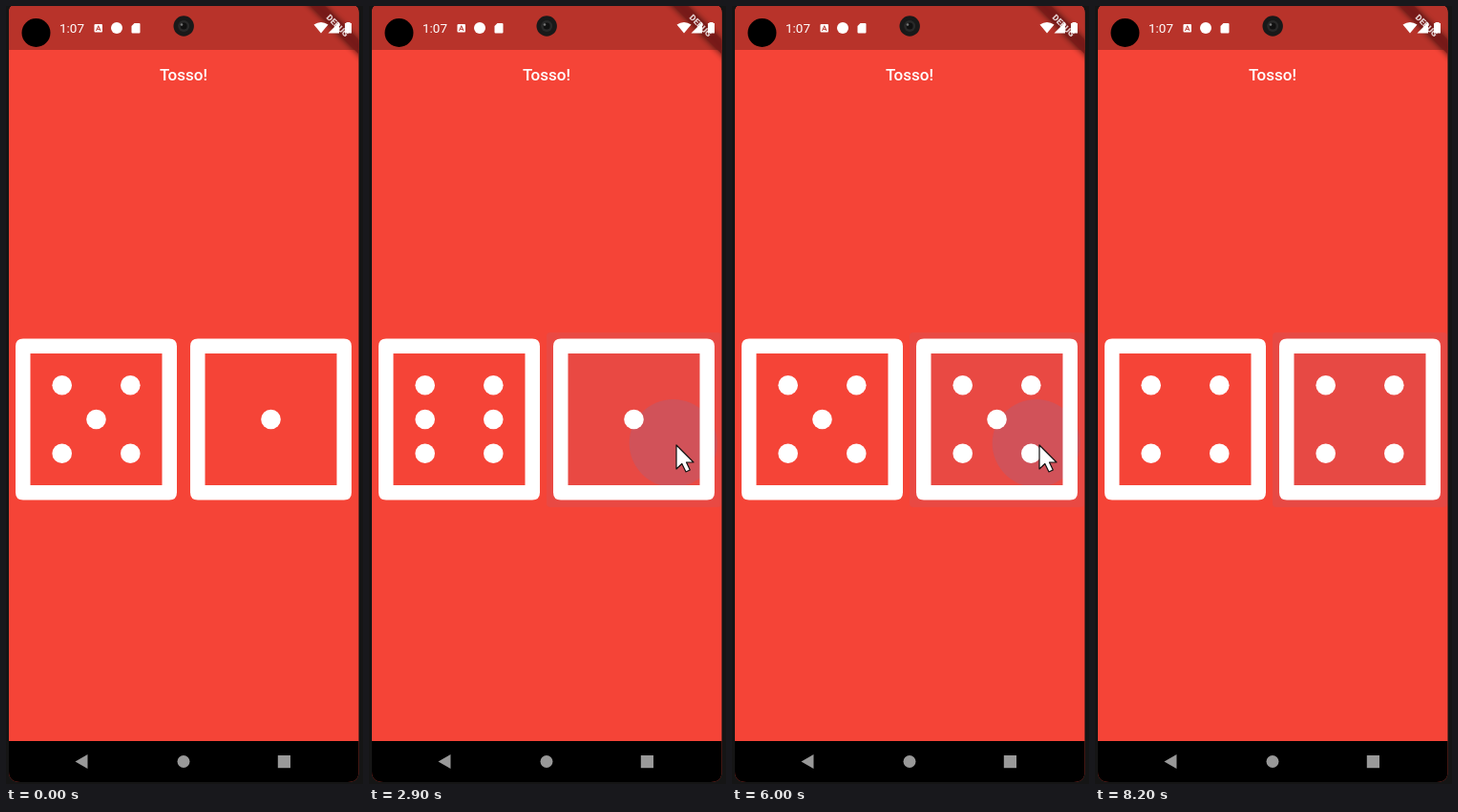
Animation, 374 px wide and 815 px high, one loop 8800 ms. Source, as an HTML page:

```html
<!DOCTYPE html>
<html lang="en">
<head>
<meta charset="utf-8">
<title>Dice app</title>
<style>
  html, body { margin: 0; width: 100%; height: 100%; overflow: hidden; background: #151515; }
  svg { display: block; }
  text { font-family: Roboto, sans-serif; fill: #fff; }
</style>
</head>
<body>
<svg width="374" height="815" viewBox="0 0 374 815">
  <defs>
    <clipPath id="screen"><path d="M3 7Q3 2 6 0H366Q369.500 2 369.500 7V802Q369.500 813 358 813H15Q3 813 3 802Z"/></clipPath>
    <clipPath id="button"><rect x="186" y="342" width="183" height="183" rx="4"/></clipPath>
    <filter id="blur" x="-20%" y="-80%" width="140%" height="260%"><feGaussianBlur stdDeviation="3"/></filter>
  </defs>

  <g clip-path="url(#screen)">
    <rect width="374" height="815" fill="#f54437"/>
    <rect width="374" height="46" fill="#b8332a"/>
    <rect y="770" width="374" height="45"/>
    <g transform="translate(347.500 20.500) rotate(45)">
      <rect x="-50" y="-5" width="100" height="11" fill="#000" opacity=".6" filter="url(#blur)"/>
      <rect x="-50" y="-5" width="100" height="10.500" fill="#7d1a19" opacity=".85"/>
      <text y="3.200" font-size="9" font-weight="900" text-anchor="middle" opacity=".8">DEBUG</text>
    </g>
  </g>

  <!-- status bar -->
  <circle cx="31.500" cy="28" r="15"/>
  <text x="56" y="28" font-size="13.500">1:07</text>
  <g fill="#fff">
    <rect x="92.500" y="19" width="8.500" height="8.500" rx="1"/>
    <circle cx="116" cy="23" r="6"/>
    <path d="M134.500 18H139.500Q140.500 18 140.500 19V27.500Q140.500 28.500 139.500 28.500H132.500Q131.500 28.500 131.500 27.500V21Z"/>
    <path d="M322.500 19.500Q330 14.500 337.500 19.500L330 28.500Z"/>
    <path d="M349 17V28.500H337.500Z"/>
    <path d="M356.500 18V17H360.500V18H362V28.500H355V18Z"/>
  </g>
  <path d="M94.500 26L96.750 20.700L99 26M95.400 24.300H98.100" fill="none" stroke="#b8332a"/>
  <circle cx="186.200" cy="21" r="10.700" fill="#191919"/>
  <circle cx="186.200" cy="21" r="6" fill="#292929"/>
  <circle cx="186.200" cy="21" r="3.500" fill="#101010"/>
  <circle cx="184" cy="19.500" r="1.300" fill="#777"/>

  <text x="186" y="77.500" font-size="17" font-weight="500" text-anchor="middle">Tosso!</text>

  <g clip-path="url(#button)" fill="#2196f3">
    <rect id="highlight" x="186" y="342" width="183" height="183"/>
    <circle id="splash"/>
  </g>
  <g id="dice" fill="#fff"></g>

  <g fill="#999">
    <path d="M72.500 791.500L85.500 784V799Z"/>
    <circle cx="186" cy="791.500" r="6.500"/>
    <rect x="284.800" y="785" width="13.200" height="13.200"/>
  </g>

  <path id="cursor" d="M0 0V25L5.800 19.500L10 28L14.300 26L10.500 18H18Z" fill="#fff" stroke="#111" stroke-width="1.200" stroke-linejoin="round"/>
</svg>

<script>
const LOOP = 8800, STEP = 100;
const TAP = [322, 460], CENTER = [277.5, 433];

// time, left face, right face
const rolls = [
  [0, 5, 1], [1200, 3, 3], [1700, 3, 4], [2300, 1, 5], [2900, 6, 1], [3500, 5, 3], [4200, 2, 6],
  [4800, 2, 4], [5400, 2, 2], [6000, 5, 5], [6700, 6, 4], [7200, 6, 2], [7900, 4, 4]
];
// time, x, y of the pointer tip
const pointerPath = [
  [600, 340, 307], [700, 324, 365], [800, 311, 425], [900, 316, 453], [1000, ...TAP],
  [8000, ...TAP], [8100, 355, 470], [8200, 390, 480]
];
// column, row and visibility rule of each pip
const pips = [
  [-1, -1, n => n > 3], [1, -1, n => n > 1],
  [-1, 0, n => n === 6], [0, 0, n => n % 2], [1, 0, n => n === 6],
  [-1, 1, n => n > 1], [1, 1, n => n > 3]
];

const byId = id => document.getElementById(id);
const clamp = x => Math.max(0, Math.min(1, x));
const mix = (a, b, k) => a + (b - a) * k;
const set = (node, attrs) => {
  for (const key in attrs) node.setAttribute(key, attrs[key]);
  return node;
};
const add = (parent, tag, attrs) =>
  parent.appendChild(set(document.createElementNS("http://www.w3.org/2000/svg", tag), attrs));

function makeDie(x) {
  const die = add(byId("dice"), "g", { transform: `translate(${x} 433)` });
  add(die, "rect", {
    x: -76.7, y: -76.5, width: 153.4, height: 153, fill: "none", stroke: "#fff", "stroke-width": 15.4
  });
  add(die, "path", {
    "fill-rule": "evenodd",
    d: "M-76.500-84.500H76.500Q84.500-84.500 84.500-76.500V76.500Q84.500 84.500 76.500 84.500H-76.500Q-84.500 84.500-84.500 76.500V-76.500Q-84.500-84.500-76.500-84.500ZM-69-69V69H69V-69Z"
  });
  die.firstChild.remove();
  const dots = pips.map(([col, row]) => add(die, "circle", { cx: col * 35.8, cy: row * 35.8, r: 10.3 }));
  return face => pips.forEach(([, , shown], i) =>
    set(dots[i], { visibility: shown(face) ? "visible" : "hidden" }));
}
const showLeft = makeDie(94.5), showRight = makeDie(277.5);

function drawInk(age, last) {
  const x = clamp((age + 50) / 300), grow = x * x * (3 - 2 * x);
  const fade = clamp((310 - age) / 150);
  const tint = Math.min(0.06 + age * 0.0006, 0.12) * fade;
  set(byId("highlight"), { opacity: last ? Math.max(tint, 0.06) : tint });
  set(byId("splash"), {
    cx: mix(TAP[0], CENTER[0], grow), cy: mix(TAP[1], CENTER[1], grow),
    r: mix(39, 134, grow), opacity: 0.12 * fade
  });
}

function drawPointer(t) {
  const next = pointerPath.findIndex(p => p[0] > t);
  const visible = next > 0;
  set(byId("cursor"), { visibility: visible ? "visible" : "hidden" });
  if (!visible) return;
  const [t0, x0, y0] = pointerPath[next - 1], [t1, x1, y1] = pointerPath[next];
  const k = (t - t0) / (t1 - t0);
  set(byId("cursor"), { transform: `translate(${mix(x0, x1, k)} ${mix(y0, y1, k)})` });
}

function draw(now) {
  const t = Math.floor(now % LOOP / STEP) * STEP;
  const current = rolls.findLastIndex(roll => roll[0] <= t);
  const [start, left, right] = rolls[current];
  showLeft(left);
  showRight(right);
  drawInk(current ? t - start : LOOP, current === rolls.length - 1);
  drawPointer(t);
}

let origin;
function tick(now) {
  origin ??= now;
  draw(now - origin);
  requestAnimationFrame(tick);
}
draw(0);
requestAnimationFrame(tick);
</script>
</body>
</html>
```
